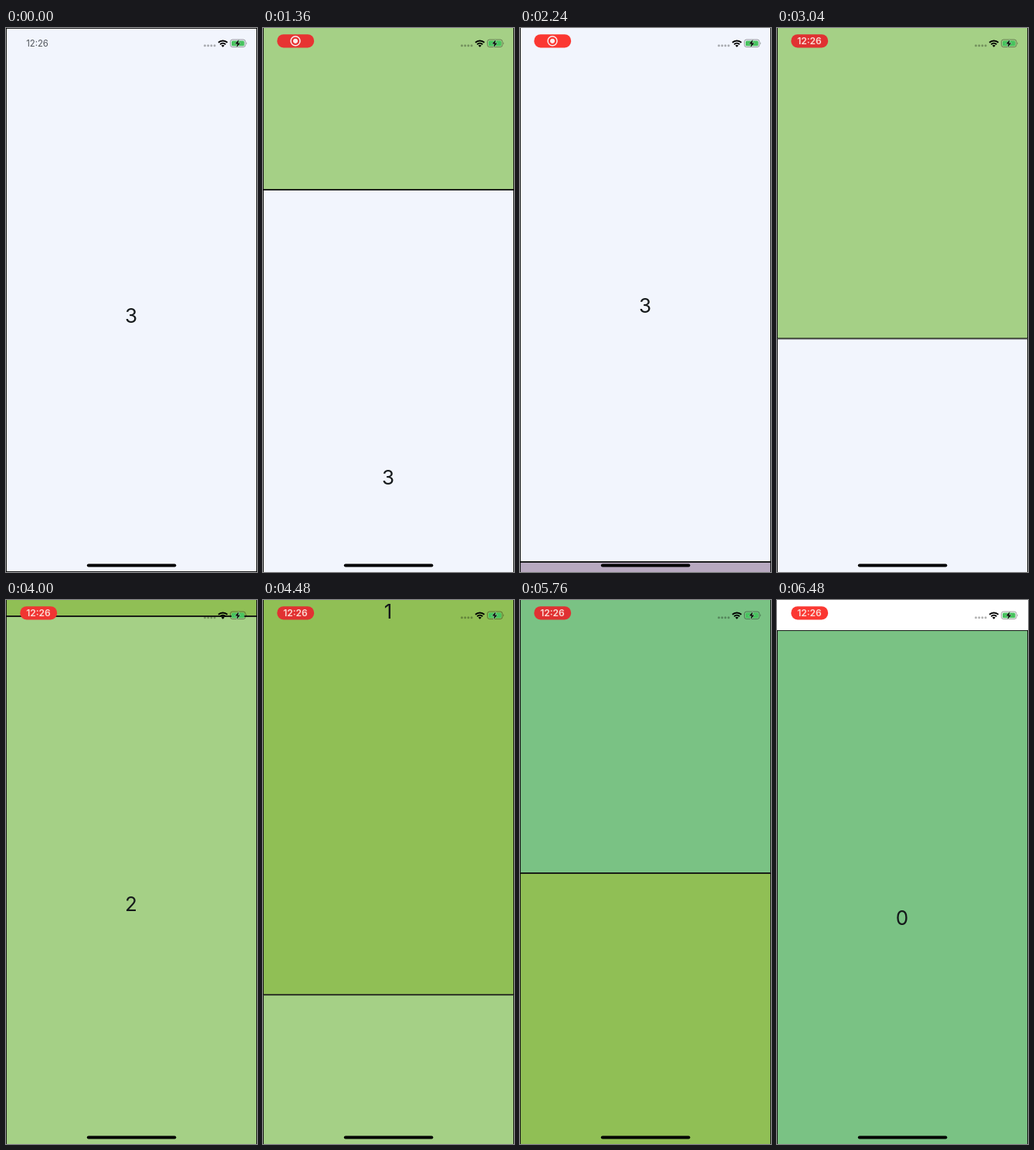
An HTML page for the animation above (6.56 s loop, 325 by 703 pixels).

```html
<!DOCTYPE html>
<html lang="en">
<head>
<meta charset="utf-8">
<title>Vertical pages</title>
<style>
  html, body { margin: 0; width: 100%; height: 100%; overflow: hidden; background: #fff; }
  svg { display: block; width: 325px; height: 703px; }
  text { font-family: Inter, "Liberation Sans", sans-serif; text-anchor: middle; }
  .number { font-size: 26px; fill: #14181a; }
</style>
</head>
<body>
<svg viewBox="0 0 325 703">
  <g id="pages"></g>

  <text id="clock" x="40.5" y="24" font-size="11.3" fill="#50545a">12:26</text>
  <g id="pill">
    <rect id="pillBody" x="18.3" y="8.2" width="47.8" height="17.3" rx="8.2"/>
    <g id="record" stroke="#fbeeee">
      <circle cx="42" cy="16.8" r="6" fill="none" stroke-width="1.5"/>
      <circle cx="42" cy="16.8" r="2.6" fill="#fbeeee"/>
    </g>
    <text id="pillTime" x="42" y="21.1" font-size="12" font-weight="600" fill="#fbdcd6">12:26</text>
  </g>

  <path d="M257.5 22.8h13" stroke="#000" stroke-opacity=".3" stroke-width="3"
    stroke-linecap="round" stroke-dasharray="0 4.2"/>
  <g fill="none" stroke="#000" stroke-width="1.9">
    <path d="M275 18.8a8.3 8.3 0 0 1 11.6 0"/>
    <path d="M277.3 21.2a5 5 0 0 1 7 0"/>
  </g>
  <path d="M278.8 22.7a2.9 2.9 0 0 1 4 0l-2 2z"/>
  <rect x="290.5" y="15" width="19.5" height="9.6" rx="2.8" fill="none" stroke="#000" stroke-opacity=".38"/>
  <path d="M311 18.2q1.6 1.6 0 3.2z" fill-opacity=".45"/>
  <rect x="292" y="16.4" width="16.6" height="6.8" rx="1.5" fill="#48c35f"/>
  <path d="M301.6 15l-5 5.6h3.1l-1.3 4.4 5-5.6h-3.1z" stroke="#b9e6c0" paint-order="stroke"/>

  <rect x="104.8" y="692.4" width="115.6" height="4.2" rx="2.1"/>
</svg>
<script>
const LOOP = 6560, STEP = 80, SCREEN = 703, TALL = 867, LINE = .87;
const $ = id => document.getElementById(id);

// Pages from top to bottom; tops are relative to page 3.
const pages = ['#7ac284', '#90bf55', '#a5d086', '#f2f5fd', '#b8a9c0'].map((fill, i) => {
  const height = i < 3 ? TALL : SCREEN;
  const top = i < 4 ? (i - 3) * TALL : SCREEN;
  return `<g transform="translate(0 ${top})">
    <rect x="${LINE / 2}" y="${LINE / 2}" width="${325 - LINE}" height="${height - LINE}"
      fill="${fill}" stroke="#000" stroke-width="${LINE}"/>
    <text class="number" x="162" y="380.5">${i}</text></g>`;
});
$('pages').innerHTML = pages.join('');

// Drag points: [time, top of page 3]
const drag = [
  [320, 0], [1360, 209], [2240, -13], [3040, 401.4], [3200, 560],
  [4000, 888], [4640, 1485], [5200, 1606], [6480, 2640]
];

const slope = (a, b) => (b[1] - a[1]) / (b[0] - a[0]);

function speed(i) {
  if (i === 0 || i === drag.length - 1) return 0;
  const a = slope(drag[i - 1], drag[i]), b = slope(drag[i], drag[i + 1]);
  return a * b <= 0 ? 0 : 2 * a * b / (a + b);
}

// Smooth curve through the drag points without overshoot.
function scroll(t) {
  if (t <= drag[0][0]) return 0;
  const i = drag.findIndex(p => p[0] >= t);
  const [t0, y0] = drag[i - 1], [t1, y1] = drag[i];
  const d = t1 - t0, u = (t - t0) / d, w = 1 - u;
  return y0 * w * w * (1 + 2 * u) + y1 * u * u * (3 - 2 * u)
    + d * u * w * (w * speed(i - 1) - u * speed(i));
}

const show = (id, on) => $(id).setAttribute('display', on ? 'inline' : 'none');

function draw(now) {
  const t = Math.floor(now % LOOP / STEP) * STEP;
  const recording = t >= 400, timed = t >= 2640;
  $('pages').setAttribute('transform', `translate(0 ${scroll(t)})`);
  show('clock', !recording);
  show('pill', recording);
  show('record', !timed);
  show('pillTime', timed);
  const glow = .5 + .5 * Math.cos((t - 2290) / 1400 * 2 * Math.PI);
  $('pillBody').setAttribute('fill', `rgb(${224 + 27 * glow}, ${49 + 7 * glow}, 50)`);
  requestAnimationFrame(draw);
}
requestAnimationFrame(draw);
</script>
</body>
</html>
```
